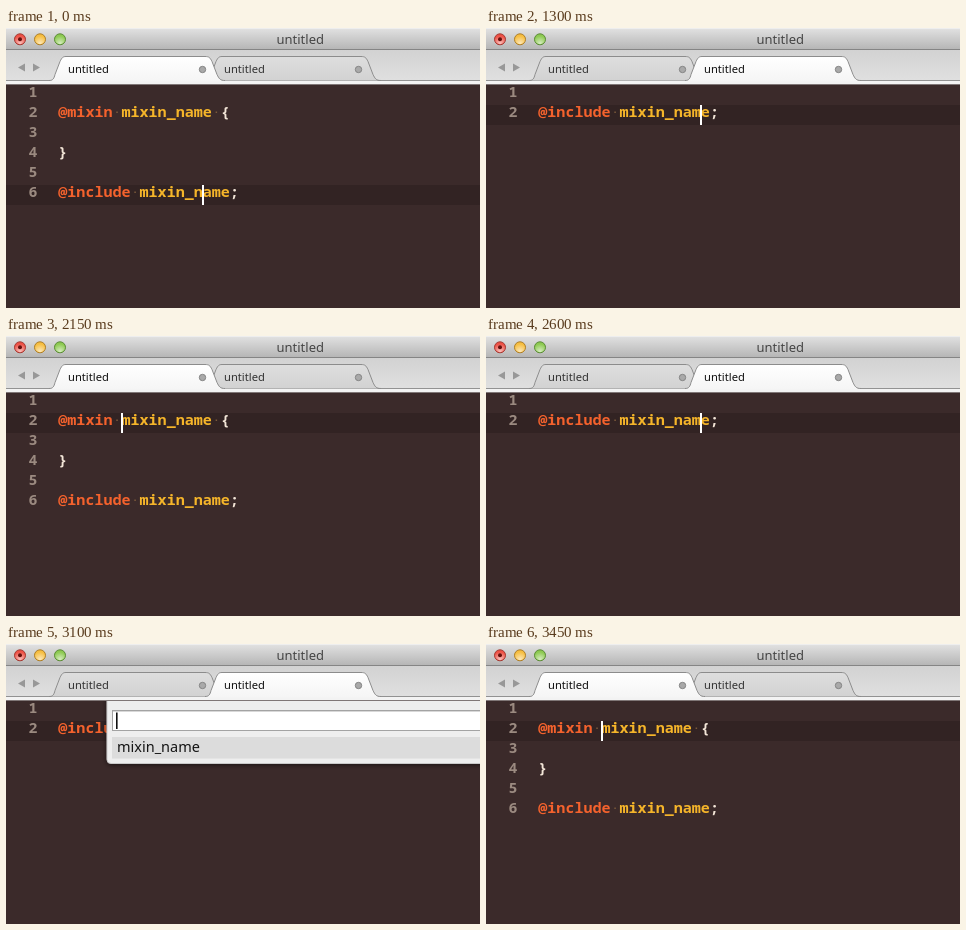
An HTML page for the animation above (4000 ms loop, 474 by 280 pixels).

```html
<!DOCTYPE html>
<html lang="en">
<head>
<meta charset="utf-8">
<title>Go to definition</title>
<style>
html, body { margin: 0; width: 100%; height: 100%; overflow: hidden; background: #3b2a2a; }
svg { display: block; width: 474px; height: 280px; }
text { white-space: pre; }
.ui { font-family: "Noto Sans", "Open Sans", sans-serif; }
.code { font: 600 15.05px "Noto Sans Mono", "DejaVu Sans Mono", monospace; }
</style>
</head>
<body>
<svg id="stage" viewBox="0 0 474 280">
  <defs>
    <linearGradient id="title" x2="0" y2="1"><stop stop-color="#e2e2e2"/><stop offset="1" stop-color="#b4b4b4"/></linearGradient>
    <linearGradient id="bar" x2="0" y2="1"><stop stop-color="#d2d2d2"/><stop offset="1" stop-color="#e0e0e0"/></linearGradient>
    <linearGradient id="idle" x2="0" y2="1"><stop stop-color="#dedede"/><stop offset="1" stop-color="#d2d2d2"/></linearGradient>
    <linearGradient id="active" x2="0" y2="1"><stop stop-color="#fff"/><stop offset="1" stop-color="#f5f5f5"/></linearGradient>
    <radialGradient id="gloss" cy=".9" r=".75"><stop stop-color="#fff" stop-opacity=".65"/><stop offset="1" stop-color="#fff" stop-opacity="0"/></radialGradient>
    <filter id="shadow" x="-10%" y="-10%" width="120%" height="140%"><feDropShadow dx="0" dy="1" stdDeviation="2.5" flood-opacity=".55"/></filter>
    <clipPath id="editor"><rect y="57" width="474" height="223"/></clipPath>
  </defs>
</svg>
<script>
const stage = document.getElementById('stage');
const LOOP = 4000, LEFT = 52.3, ADVANCE = 9.03, ROW = 20, TOP = 57;
const ORANGE = '#f4622d', YELLOW = '#f5b52a', CREAM = '#f3e6d8';

const rect = (x, y, w, h, fill, more = '') =>
  `<rect x="${x}" y="${y}" width="${w}" height="${h}" fill="${fill}" ${more}/>`;
const circle = (x, y, r, fill, more = '') =>
  `<circle cx="${x}" cy="${y}" r="${r}" fill="${fill}" ${more}/>`;
const label = (x, y, size, fill, str) =>
  `<text class="ui" x="${x}" y="${y}" font-size="${size}" fill="${fill}">${str}</text>`;
const code = (x, row, fill, str) =>
  `<text class="code" x="${x}" y="${TOP + row * ROW - 8}" fill="${fill}">${str}</text>`;

const light = (x, fill, edge) =>
  circle(x, 11.3, 5.5, fill, `stroke="${edge}"`) + circle(x, 11.3, 5, 'url(#gloss)');

function chrome() {
  return rect(0, 0, 474, 22, 'url(#title)') + rect(0, 0, 474, 1, '#eee') +
    rect(0, 21, 474, 1, '#858585') + rect(0, 22, 474, 31, 'url(#bar)') +
    rect(0, 52, 474, 1, '#929292') + rect(0, 53, 474, 3, '#f3f3f3') +
    rect(0, 56, 474, 1, '#807777') +
    light(14, '#ee5044', '#a33a33') + circle(14, 11.3, 2, '#65100d') +
    light(34, '#f6bd3e', '#ad7e27') + light(54, '#8cc94f', '#5b8b37') +
    label(270.5, 16, 13, '#454545', 'untitled') +
    '<path d="M19 35.5v8l-7-4z M27 35.5v8l7-4z" fill="#989898"/>';
}

function tab(index, active) {
  const outline = 'M43 52.5c4 0 5-2 6-6l5-13c2-4 3-5 6-5H199c4 0 5 1 7 5l5 13c2 4 3 6 8 6';
  return `<g transform="translate(${index * 156})">
    <path d="${outline}${active ? 'v1H43z' : ''}" fill="url(#${active ? 'active' : 'idle'})"/>
    <path d="${outline}" fill="none" stroke="#8c8c8c"/>
    ${label(62, 45, 11.2, active ? '#111' : '#333', 'untitled')}
    ${circle(196.5, 41.5, 3.2, '#a9a9a9', 'stroke="#858585"')}</g>`;
}

// Each line is a list of [text, colour]; spaces are shown as faint dots.
function codeLine(parts, row) {
  let col = 0, out = '';
  for (const [str, fill] of parts) {
    const x = LEFT + col * ADVANCE;
    out += str === ' '
      ? rect(x + 3.8, TOP + row * ROW - 13.5, 1.5, 1.5, '#7b5a3b')
      : code(x, row, fill, str);
    col += str.length;
  }
  return out;
}

const space = [' '], name = ['mixin_name', YELLOW];
const include = [['@include', ORANGE], space, name, [';', CREAM]];
const docs = [
  [[], [['@mixin', ORANGE], space, name, space, ['{', CREAM]], [], [['}', CREAM]], [], include],
  [[], include]
];

function panel() {
  return `<g clip-path="url(#editor)">
    <rect x="101" y="50" width="390" height="69.5" rx="4" fill="#eeeeee" stroke="#c9c9c9" filter="url(#shadow)"/>` +
    rect(106.5, 66.5, 380, 20, '#fff', 'stroke="#a3a3a3"') + rect(107, 67, 367, 1, '#d8d8d8') +
    rect(106, 93, 368, 21.5, '#dcdcdc') + rect(110, 68.5, 1.6, 16.5, '#111') +
    label(111, 108, 14.5, '#151515', 'mixin_name') + '</g>';
}

function scene(doc, row, col, withPanel) {
  const y = TOP + (row - 1) * ROW;
  const lines = docs[doc];
  return rect(0, 57, 474, 223, '#3b2a2a') + rect(0, y, 474, ROW, '#322323') +
    lines.map((parts, i) => code(22.6, i + 1, '#9b8a80', i + 1) + codeLine(parts, i + 1)).join('') +
    rect(Math.round(LEFT + col * ADVANCE) - 1, y, 2, ROW, '#fff') +
    tab(1 - doc, false) + tab(doc, true) + (withPanel ? panel() : '');
}

const scenes = {
  usage: scene(0, 6, 16),
  definition: scene(0, 2, 7),
  otherFile: scene(1, 2, 18),
  search: scene(1, 2, 18, true)
};
const timeline = [
  [0, 'usage'], [800, 'definition'], [1250, 'otherFile'], [1750, 'definition'],
  [2250, 'otherFile'], [2750, 'search'], [3250, 'definition'], [LOOP, 'definition']
];

stage.insertAdjacentHTML('beforeend', chrome() +
  Object.entries(scenes).map(([id, body]) => `<g id="${id}">${body}</g>`).join(''));

for (const id of Object.keys(scenes)) {
  const frames = timeline.map(([at, shown]) =>
    ({ offset: at / LOOP, opacity: shown === id ? 1 : 0, easing: 'step-end' }));
  document.getElementById(id).animate(frames, { duration: LOOP, iterations: Infinity });
}
</script>
</body>
</html>
```
